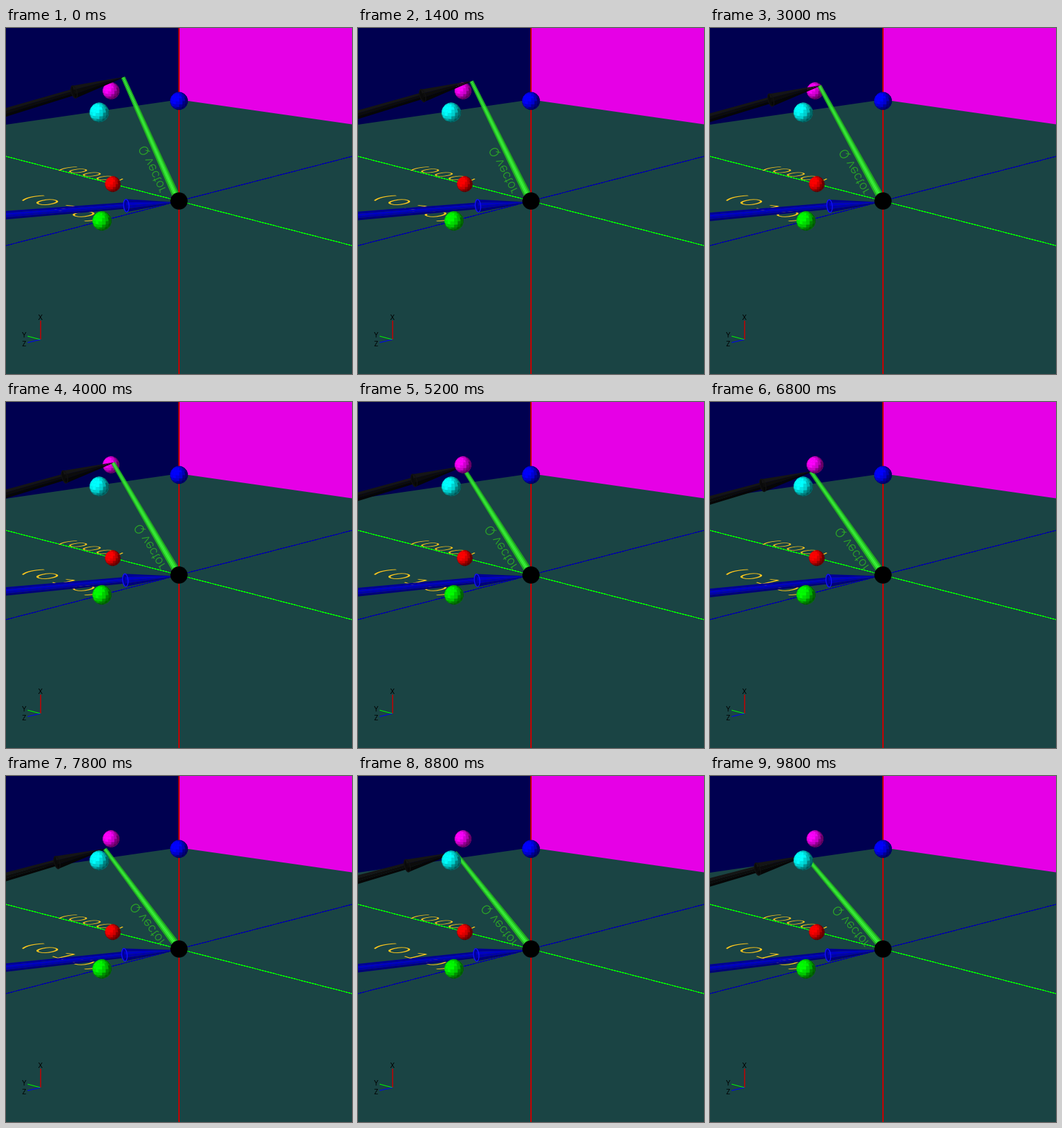
Animation, 512 px wide and 512 px high, one loop 10000 ms. Source, as an HTML page:

```html
<!DOCTYPE html>
<html lang="en">
<head>
<meta charset="utf-8">
<title>Q vector rotation</title>
<style>
html, body { margin: 0; width: 100%; height: 100%; overflow: hidden; background: #1a4444; }
svg { display: block; width: 100vw; height: 100vh; }
text { font-family: Inter, "Liberation Sans", sans-serif; }
.plane { fill: #ffc81e; font-weight: 300; font-feature-settings: "tnum"; }
.mini { font-size: 10px; text-anchor: middle; fill: #000; }
</style>
</head>
<body>
<svg id="stage" viewBox="0 0 512 512">
  <rect width="512" height="512" fill="#1a4444"/>
  <path d="M0 0H256V106L0 143Z" fill="#000050"/>
  <path d="M256 0H512V142.500L256 106Z" fill="#e600e6"/>
  <path d="M256 0V512" stroke="#c80000" stroke-width="2"/>
  <g stroke-width="1.400" shape-rendering="crispEdges">
    <path d="M0 322L512 190" stroke="#0000a4"/>
    <path d="M0 190L512 322" stroke="#00f800"/>
  </g>
  <text class="plane" font-size="29" letter-spacing="1.500" transform="matrix(1 .26 -1 .22 74 208)">(000)</text>
  <text class="plane" font-size="35" letter-spacing="4.300" transform="matrix(1 .33 -1 .24 19 251)">(010)</text>
  <g id="scene"></g>
  <g fill="none">
    <path d="M51.300 461V433" stroke="#c80000" stroke-width="1.500"/>
    <path d="M51 461L32 456" stroke="#00f800" stroke-width="1.200"/>
    <path d="M51 461L32 465.500" stroke="#0000f8" stroke-width="1.200"/>
  </g>
  <text class="mini" x="51" y="431.500">X</text>
  <text class="mini" x="27" y="458">Y</text>
  <text class="mini" x="27" y="471">Z</text>
</svg>
<script>
const LOOP = 10000, STEP = 200;
const scene = document.getElementById('scene');

function add(parent, tag, attrs = {}) {
  const el = document.createElementNS('http://www.w3.org/2000/svg', tag);
  for (const key in attrs) el.setAttribute(key, attrs[key]);
  parent.appendChild(el);
  return el;
}
const group = () => add(scene, 'g');
const fmt = p => p[0].toFixed(2) + ',' + p[1].toFixed(2);

// Faceted ball lit from the upper left
function ball(cx, cy, r, rgb) {
  const g = group(), rows = 9, cols = 16, tilt = 0.26;
  const tint = k => 'rgb(' + rgb.map(c => Math.round(Math.min(255, c * k))) + ')';
  const point = (i, j) => {
    const a = i / rows * Math.PI, b = j / cols * Math.PI * 2;
    const x = Math.sin(a) * Math.cos(b), y = -Math.cos(a), z = Math.sin(a) * Math.sin(b);
    return [x, y * Math.cos(tilt) + z * Math.sin(tilt), z * Math.cos(tilt) - y * Math.sin(tilt)];
  };
  add(g, 'circle', { cx, cy, r, fill: tint(0.55) });
  for (let i = 0; i < rows; i++) for (let j = 0; j < cols; j++) {
    const n = point(i + 0.5, j + 0.5);
    if (n[2] < 0.08) continue;
    const light = Math.max(0, -0.55 * n[0] - 0.33 * n[1] + 0.77 * n[2]);
    const fill = tint(0.38 + 0.72 * light + ((i + j) % 2 ? 0.04 : -0.04));
    const corners = [point(i, j), point(i, j + 1), point(i + 1, j + 1), point(i + 1, j)];
    add(g, 'polygon', {
      points: corners.map(p => fmt([cx + p[0] * r, cy + p[1] * r])).join(' '),
      fill, stroke: fill, 'stroke-width': 0.4
    });
  }
  return g;
}

// Tapered rod made of lengthwise strips
function rod(parent, colors) {
  const strips = colors.map(fill => add(parent, 'polygon', { fill }));
  return (p, q, w0, w1) => {
    const dx = q[0] - p[0], dy = q[1] - p[1], len = Math.hypot(dx, dy);
    const side = (c, w, s) => fmt([c[0] - dy / len * w * s, c[1] + dx / len * w * s]);
    strips.forEach((strip, i) => {
      const a = 2 * i / strips.length - 1, b = 2 * (i + 1) / strips.length - 1;
      strip.setAttribute('points',
        [side(p, w0, a), side(q, w1, a), side(q, w1, b), side(p, w0, b)].join(' '));
    });
  };
}

function arrow(colors, rim, back) {
  const g = group(), shaft = rod(g, colors);
  const base = add(g, 'ellipse', { rx: 4.5, ry: 9.5, fill: back });
  const cone = rod(g, colors);
  const ring = add(g, 'ellipse', { rx: 4, ry: 9.5, fill: 'none', stroke: rim, 'stroke-width': 1.3 });
  return (tail, neck, tip) => {
    shaft(tail, neck, 6.3, 4.8);
    cone(neck, tip, 9.5, 0.6);
    const turn = Math.atan2(tip[1] - tail[1], tip[0] - tail[0]) * 180 / Math.PI;
    for (const el of [base, ring])
      el.setAttribute('transform', `translate(${fmt(neck)}) rotate(${turn.toFixed(2)})`);
  };
}

const magenta = ball(155.5, 93, 12.3, [250, 0, 250]);
const blackArrow = arrow(['#151515', '#0c0c0c', '#060606'], '#121212', '#0a0a0a');
const label = add(scene, 'text', { 'font-size': 18.8, 'font-weight': 300, fill: '#2ca626' });
label.textContent = 'Q vector';
const bar = rod(group(), ['#20a81e', '#2ee22a', '#3cfc38', '#34ee30', '#22b020']);
const blueArrow = arrow(['#000094', '#0000c4', '#0000a8', '#000078'], '#1414ff', '#000098');
const cyan = ball(138, 125, 14.2, [0, 255, 255]);
ball(256, 108, 13, [0, 0, 255]);
ball(158, 231, 11.3, [255, 0, 0]);
ball(142, 285.5, 14, [0, 250, 0]);
add(scene, 'circle', { cx: 256, cy: 256, r: 12.8, fill: '#000' });

function draw(ms) {
  const t = Math.floor(ms % LOOP / STEP) * STEP / 1000;
  const tip = [173.3 - 4 * t + 0.07 * t * t, 73 + 4 * t + 0.062 * t * t];
  const foot = [252.3, 250];

  const slope = 0.298 - 0.002 * t, reach = 72.5 - 0.2 * t;
  blackArrow([-4, tip[1] + slope * (tip[0] + 4)],
    [tip[0] - reach, tip[1] + slope * reach], tip);
  blueArrow([-4, 277.3 + 0.85 * t], [178 - 0.35 * t, 262.8 + 0.23 * t], [249, 258]);
  bar(tip, foot, 3, 5.5);

  // Mirrored lettering runs beside the bar, down to its foot
  const dx = foot[0] - tip[0], dy = foot[1] - tip[1], len = Math.hypot(dx, dy);
  const ux = dx / len, uy = dy / len, start = 89.5 - 0.3 * t, gap = 9.5;
  const m = [ux, uy, uy, -ux,
    foot[0] - ux * start - uy * gap, foot[1] - uy * start + ux * gap];
  label.setAttribute('transform', `matrix(${m.map(v => v.toFixed(4)).join(' ')})`);

  // The tip sinks behind the magenta ball as it turns away
  const before = t < 4.2 ? scene.firstChild : cyan;
  if (t < 4.2 ? before !== magenta : magenta.nextSibling !== cyan)
    scene.insertBefore(magenta, before);
}

const begin = performance.now();
function tick() {
  draw(performance.now() - begin);
  requestAnimationFrame(tick);
}
tick();
</script>
</body>
</html>
```
